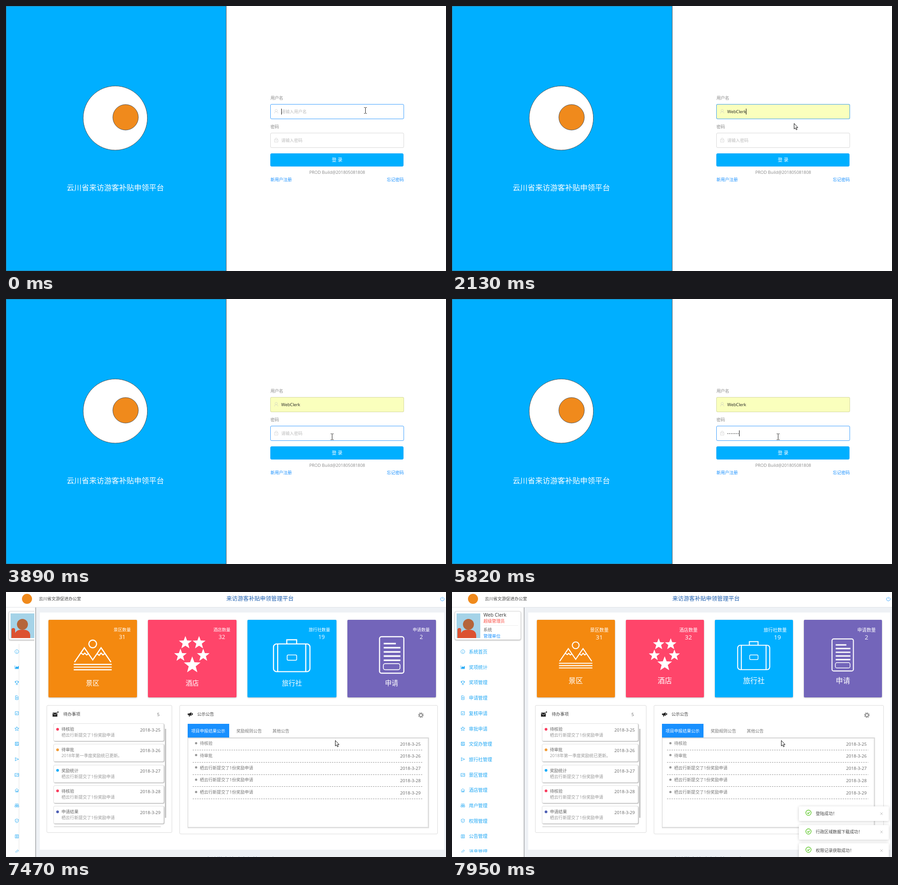
These frames come from a looping animation (964 by 581 pixels, 8 s). An HTML page:

```html
<!DOCTYPE html>
<html lang="zh-CN">
<head>
<meta charset="utf-8">
<title>登录</title>
<style>
html, body { margin: 0; width: 100%; height: 100%; overflow: hidden; background: #fff; }
body { font: 9.3px/20px "Open Sans", "Noto Sans CJK SC", "Noto Sans CJK", sans-serif; color: #555; }
#stage { position: relative; width: 964px; height: 581px; overflow: hidden; }
#stage div, #stage span, #stage svg { position: absolute; box-sizing: border-box; }
svg { overflow: visible; fill: none; stroke: currentColor; }
.t { margin-top: -10px; white-space: nowrap; }
.mid { transform: translateX(-50%); }
.end { transform: translateX(-100%); }
.page { inset: 0; }
.field { left: 579px; width: 293px; height: 33px; padding-left: 23px; border: 1px solid; border-radius: 3px;
  display: flex; align-items: center; white-space: pre; color: #222; }
#stage .field span { position: static; }
.field .caret { width: 1px; height: 13px; margin-right: -1px; background: #111; }
.field .hint { color: #bbb; }
.yellow { background: #faffbd; }
#dots .value { font-size: 7.5px; letter-spacing: .9px; }
#button { left: 579px; top: 323px; width: 292px; height: 29px; border: 1px solid; border-radius: 3px; font-weight: 500; }
#list { left: 579px; top: 247px; width: 293px; height: 21px; border: 1px solid #b4b4b4; background: #fff; }
#dash { background: #eef1f5;
  --c: calc((842.5px - var(--w)) / 4);
  --l: calc((938.5px - var(--w)) / 3 - 16px);
  --a: calc(var(--w) + 23.5px);
  --r: calc(var(--a) + var(--l) + 16px); }
.tile { top: 61px; width: var(--c); height: 170px; border-radius: 2px; color: #fff; box-shadow: 0 1px 3px #0004; }
.tile svg { left: 50%; top: 76.5px; width: 42.8%; transform: translate(-50%, -50%); stroke-width: 2.9; }
.tile .num { right: 13.5px; text-align: center; }
.panel { top: 248px; background: #fff; border: 1px solid #dcdcdc; border-radius: 3px; }
.task { left: 14px; right: 17px; height: 39px; background: #fff; border: 1px solid #e2e2e2; border-radius: 3px;
  box-shadow: 1px 1px 2px #0005; }
.dot { border-radius: 50%; }
.toast { left: 760px; width: 197px; height: 32px; background: #fff; border-radius: 2px; box-shadow: 0 1px 6px #0003; }
</style>
</head>
<body>
<div id="stage"></div>
<script>
const LOOP = 8000;
const SKY = '#00afff';
const px = v => typeof v === 'number' ? v + 'px' : v;

// Text is placed by the middle of its line.
const txt = (x, y, s, color = '', size = 9.3, align = '') =>
  `<span class="t ${align}" style="left:${px(x)};top:${y}px;color:${color};font-size:${px(size)}">${s}</span>`;
const box = (x, y, w, h, style, inner = '') =>
  `<div style="left:${px(x)};top:${y}px;width:${px(w)};height:${px(h)};${style}">${inner}</div>`;
const disc = (x, y, r, color) =>
  `<div class="dot" style="left:${px(x)};top:${y - r}px;margin-left:${-r}px;width:${2 * r}px;height:${2 * r}px;background:${color}"></div>`;
const icon = (x, y, size, color, body, view = 16) =>
  `<svg viewBox="0 0 ${view} ${view}" style="left:${px(x)};top:${y - size / 2}px;margin-left:${-size / 2}px;width:${size}px;height:${size}px;color:${color}">${body}</svg>`;
const path = (d, extra = '') => `<path d="${d}" ${extra}/>`;
const SOLID = 'fill="currentColor" stroke="none"';

function star(cx, cy, r) {
  const pts = Array.from({ length: 10 }, (_, i) => {
    const a = i * Math.PI / 5, q = i % 2 ? r * .42 : r;
    return (cx + q * Math.sin(a)).toFixed(1) + ',' + (cy - q * Math.cos(a)).toFixed(1);
  });
  return 'M' + pts.join('L') + 'z';
}

// ---- Login ----
const field = (id, y, hint) =>
  `<div class="field" id="${id}" style="top:${y}px"><span class="value"></span><span class="caret"></span><span class="hint">${hint}</span></div>`;

const backdrop = `<svg width="964" height="581" style="left:0;top:0" stroke="none">
  <rect width="482.6" height="581" fill="${SKY}"/>
  <circle cx="239.4" cy="245.7" r="70.3" fill="#fff"/>
  <circle cx="262" cy="244" r="28" fill="#f08a1c"/></svg>`;

const login = `<div class="page" id="login" style="background:#fff">
  ${backdrop}
  ${txt(239.5, 398, '云川省来访游客补贴申领平台', '#fff', 16.4, 'mid')}
  ${txt(579.5, 202, '用户名', '#888')}
  ${field('user', 215, '请输入用户名')}
  ${icon(591.5, 231, 10, '#c4c4c4', path('M8 1a4 4 0 1 0 .01 0M2 15c0-4 2-6 6-6s6 2 6 6'))}
  ${txt(579.5, 265, '密码', '#888')}
  ${field('dots', 278, '请输入密码')}
  ${icon(591.5, 294, 10, '#c4c4c4', path('M2 6h12v9H2zM4 6V4a4 3 0 0 1 8 0v2M6 10h4'))}
  <div id="button" style="background:${SKY}">${txt(145.5, 13, '登 录', '#fff', 10.3, 'mid')}</div>
  ${txt(725.5, 365, 'PROD Build@201805081808', '#888', 9.3, 'mid')}
  ${txt(579.5, 381, '新用户注册', '#1890ff')}
  ${txt(871.5, 381, '忘记密码', '#1890ff', 9.3, 'end')}
  <div id="list">${txt(8, 9.5, 'WebClerk', '#222')}</div>
</div>`;

// ---- Dashboard ----
const menu = [
  ['系统首页', 'M8 1a7 7 0 1 0 .01 0M8 7v5M8 4v1'],
  ['奖项统计', 'M1 2v12h14', 'M3 13V9l4-4 3 3 5-5v10z'],
  ['奖项管理', 'M4 2h8v5a4 4 0 0 1-8 0zM4 4H1q0 4 3 4M12 4h3q0 4-3 4M8 11v3M4 15h8'],
  ['申请管理', 'M3 1h7l3 3v11H3zM5 7h6M5 10h6'],
  ['复核申请', 'M2 2h12v12H2zM5 8l2 3 4-5'],
  ['审批申请', star(8, 8.5, 8)],
  ['文促办管理', 'M2 2h12v12H2zM5 2v6h5V2M2 12h12'],
  ['旅行社管理', 'M2 2l13 6-9 3-4 3 1-6z'],
  ['景区管理', 'M1 3h14v11H1zM3 11l3-3 2 2 3-4 3 4'],
  ['酒店管理', 'M1 8l7-6 7 6M3 7v7h10V7M7 14v-4h3v4'],
  ['用户管理', 'M5 2a3 3 0 1 0 .01 0M11 2a3 3 0 1 0 .01 0M1 14V9h6v5zM9 14V9h6v5z'],
  ['权限管理', 'M8 1l6 2v5q0 5-6 7-6-2-6-7V3zM5 8l2 2 4-4'],
  ['公告管理', 'M2 2h12v12H2zM5 5h6M5 8h6M5 11h6'],
  ['消息管理', 'M3 13l1-4 7-7 3 3-7 7z']
];
const menuHtml = menu.map(([name, line, solid], i) => {
  const y = 97 + i * 33.7;
  return icon(24, y, 9.5, '#1ea7f5', path(line, 'stroke-width="1.4"') + (solid ? path(solid, SOLID) : '')) +
    box(37, y - 10, 'calc(6px + (var(--w) - 83px) * .8)', 20, 'overflow:hidden', txt(0, 10, name, '#1ea7f5', 10.2));
}).join('');

const avatar = box(3, 4, 52, 54, 'overflow:hidden;background:#a5d3e8',
  disc(26, 24, 12, '#b5653a') + box(9, 36, 34, 22, 'background:#dc5230;border-radius:12px 12px 0 0') +
  box(2, 32, 8, 26, 'background:#dc5230;border-radius:5px 5px 0 0'));

const sidebar = box(0, 34, 'var(--w)', 547, 'background:#fff') +
  box(0, 34, 'calc(var(--w) - 3px)', 537, 'overflow:hidden',
    box(6, 8, 145, 63, 'background:#fff;border:1px solid #ddd;border-radius:4px;box-shadow:0 1px 3px #0005',
      avatar + txt(62, 7, 'Web Clerk', '#333', 10.6) + txt(62, 21, '超级管理员', '#fa4b41') +
      box(62, 30, 76, 1, 'background:#eee') + txt(62, 40, '系统', '#666') + txt(62, 54, '管理单位', '#1890ff')) +
    box('calc(53px + (var(--w) - 83px) * 1.37)', 80, 1, 457, 'background:#e6e6e6') + menuHtml) +
  box('calc(var(--w) - 1px)', 34, 2, 547, 'background:#b6b8bb');

const header = box(0, 0, 964, 34, 'background:#fff;border-bottom:1px solid #dfe2e6') +
  disc(46, 15, 11, '#f08a1c') +
  txt(72, 15, '云川省文游促进办公室', '#444', 9.25) +
  txt(556.5, 15, '来访游客补贴申领管理平台', '#1d5fb0', 12.3, 'mid') +
  icon(956, 15, 10, '#40a9ff', path('M5 3a6.5 6.5 0 1 0 6 0M8 1v7', 'stroke-width="1.6"'));

const stars = [[32, 18, 18], [68, 18, 18], [19, 51, 17.5], [79, 51, 17.5], [50, 77, 23]];
const tiles = [
  ['景区', 31, '#f4890f',
    path('M50 11a10 10 0 1 0 .01 0M2 69L28 31 50 63 72 31 98 69M19 45l6 4 4-4 5 5 4-3M62 47l5 4 5-6 5 5 5-4M0 75h100M0 82h100M0 89h100')],
  ['酒店', 32, '#ff456a', stars.map(s => path(star(...s), SOLID)).join('')],
  ['旅行社', 19, SKY,
    '<rect x="2" y="21" width="96" height="73" rx="8"/><rect x="38" y="50" width="25" height="14" rx="3" stroke-width="2"/>' +
    path('M37 21V10h26v11M13 21v73M87 21v73')],
  ['申请', 2, '#7365ba',
    '<rect x="18" y="2" width="64" height="96" rx="5"/><rect x="28" y="73" width="44" height="16" rx="5" stroke-width="2"/>' +
    path('M29 20h32M29 31h44M29 42h44M29 53h44M29 64h44', 'stroke-width="4"')]
];
const tileHtml = tiles.map(([name, n, color, art], i) =>
  `<div class="tile" style="left:calc(var(--w) + 27.5px + ${i} * (var(--c) + 24px));background:${color}">
    <span class="t num" style="top:22px;font-size:calc(9.4px * var(--k))">${name}数量</span>
    <span class="t num" style="top:38px;width:calc(37.6px * var(--k));font-size:calc(12.5px * var(--k))">${n}</span>
    <svg viewBox="0 0 100 100">${art}</svg>
    <span class="t mid" style="left:50%;top:calc(96.5px + var(--c) * .215);font-size:calc(14.6px * var(--k))">${name}</span>
  </div>`).join('');

const news = '栖云行新提交了1份奖励申请';
const tasks = [
  ['待核验', news, '#f93e5f'], ['待审批', '2018年第一季度奖励统已更新。', '#f19c38'],
  ['奖励统计', news, '#18aefa'], ['待核验', news, '#f93e5f'], ['申请结果', news, '#4f60b5']
];
const taskHtml = tasks.map(([name, sub, color], i) =>
  `<div class="task" style="top:${39 + i * 45.3}px">${disc(8, 11.5, 3, color)}
    ${txt(17, 12, name, '#666')}${txt(17, 25, sub, '#999')}
    ${txt('calc(100% - 6px)', 13.5, '2018-3-' + (25 + i), '#666', 9.7, 'end')}</div>`).join('');

const todo = `<div class="panel" style="left:var(--a);width:var(--l);height:280px">
  ${icon(19, 19, 14, '#222', path('M0 4h12v10H0zM12 1h3v3h-3z', SOLID) + path('M0 5l6 5 6-5', 'stroke="#fff"'))}
  ${txt(36, 19, '待办事项', '#444')}
  ${txt('calc(100% - 29px)', 20, '5', '#666', 9.7, 'mid')}
  ${taskHtml}
  ${box('calc(100% - 15px)', 51, 3, 195, 'background:#c4c4c4')}
  ${box(15, 264, 'calc(100% - 39px)', 3, 'background:#e6e6e6')}
</div>`;

const rows = ['待核验', '待审批', news, news, news].map((s, i) => {
  const y = 83 + i * 26.8;
  return disc(36, y - 1, 2.5, '#999') + txt(44, y, s, '#777') +
    txt('calc(100% - 37px)', y + 1.5, '2018-3-' + (25 + i), '#666', 9.7, 'end') +
    box(28, Math.round(y + 14), 'calc(100% - 61px)', 1, 'background:repeating-linear-gradient(90deg,#999 0 3px,#fff 3px 5px)');
}).join('');

const notice = `<div class="panel" style="left:var(--r);width:calc(946.5px - var(--r));height:283px">
  ${icon(23, 19, 12, '#222', path('M0 6h4l7-4v11l-7-3H0zM3 10h3v5H4zM12 5h3v5h-3z', SOLID))}
  ${txt(38, 19, '公示公告', '#444')}
  ${icon('calc(100% - 36px)', 21, 12, '#999', '<circle cx="8" cy="8" r="4.6" stroke-width="3.2"/><circle cx="8" cy="8" r="7" stroke-width="2.4" stroke-dasharray="2.75"/>')}
  ${box(17, 70, 'calc(100% - 35px)', 199, 'border:1px solid #ccc;border-width:2px 3px 3px 1px;border-color:#d4d4d4 #e0e0e0 #e0e0e0 #ccc')}
  ${box(17, 40, 91, 30, 'background:#1890ff')}
  ${txt(62.5, 56, '项目申报结果公示', '#fff', 9.3, 'mid')}
  ${txt(124, 56, '奖励规则公告', '#777')}
  ${txt(203, 56, '其他公告', '#777')}
  ${rows}
</div>`;

const dash = `<div class="page" id="dash">
  ${box('calc(var(--w) + 9px)', 45, 'calc(951px - var(--w))', 520, 'background:#fff')}
  ${txt('calc((var(--w) + 964px) / 2)', 586, '来访游客补贴申领管理平台', '#6d86ad', 13, 'mid')}
  ${tileHtml}${todo}${notice}${sidebar}${header}
</div>`;

const toasts = [['登陆成功！', 7470], ['行政区域数据下载成功！', 7640], ['权限记录获取成功！', 7700]];
const toastHtml = toasts.map(([s], i) =>
  `<div class="toast" style="top:${470 + i * 40.5}px">
    ${icon(21, 14, 14, '#52c41a', '<circle cx="8" cy="8" r="6.6" stroke-width="1.4"/>' + path('M5 8l2.2 2.5L11 6', 'stroke-width="1.5"'))}
    ${txt(37, 15.5, s, '#444')}
    ${icon(180.5, 15.5, 6, '#aaa', path('M1 1l14 14M15 1L1 15', 'stroke-width="2"'))}
  </div>`).join('');

const pointer = `<svg id="arrow" width="10" height="16" viewBox="0 0 10 16">
    ${path('M.5 .5v12.2l2.7-2.5 1.9 4.3 2-.9-1.9-4.1h3.6z', 'fill="#fff" stroke="#111"')}</svg>
  <svg id="beam" width="7" height="14" viewBox="0 0 7 14" style="margin:-7px 0 0 -3px">
    ${path('M.5 .5h2l1 .8 1-.8h2M.5 13.5h2l1-.8 1 .8h2M3.5 1v12', 'stroke="#222"')}</svg>`;

document.getElementById('stage').innerHTML = login + dash + toastHtml + pointer;

// ---- Motion ----
const $ = id => document.getElementById(id);
const toastEls = document.querySelectorAll('.toast');
const clamp = v => Math.min(1, Math.max(0, v));
const smooth = v => { v = clamp(v); return v * v * (3 - 2 * v); };
const easeOut = v => 1 - (1 - clamp(v)) ** 3;
const within = (t, spans) => spans.some(([a, b]) => t >= a && t < b);

const SUGGEST = 1260, FILL = 1760, SUGGEST_END = 2130;
const SWITCH = 3070, HOVER = 6770, SUBMIT = 7100, OPEN = 7470, STEP = 62;

// start, end, steps, target x, target y
const moves = [
  [940, 940, 1, 776, 229], [1570, 1880, 6, 749, 257],
  [2380, 3010, 10, 714, 302], [6640, 6830, 4, 721, 325]
];
const keyTimes = [4210, 4340, 4640, 4890, 5210, 5520, 5820, 6140];
const userCaret = [[0, 690], [1190, 1690], [SUGGEST_END, 2630]];
const passCaret = [[SWITCH, 3890], [4210, 6640]];

function mouseAt(t) {
  let x = 787, y = 229;
  for (const [a, b, n, tx, ty] of moves) {
    if (t < a) break;
    const step = Math.min(n, Math.floor((t - a) / (b - a || 1) * (n - 1)) + 1);
    const k = Math.sin(step / n * Math.PI / 2);
    x += (tx - x) * k;
    y += (ty - y) * k;
  }
  return [Math.round(x), Math.round(y)];
}

function setField(id, value, caret, focus) {
  const el = $(id), [val, bar, hint] = el.children;
  val.textContent = value;
  bar.style.opacity = caret ? 1 : 0;
  hint.style.display = value ? 'none' : '';
  el.style.borderColor = `rgba(0,${130 * focus},${255 * focus},${.15 + .6 * focus})`;
}

function render(t) {
  const filled = t >= FILL;
  const switched = clamp((t - SWITCH) / 200);
  setField('user', filled ? 'WebClerk' : '', within(t, userCaret), 1 - switched);
  $('user').classList.toggle('yellow', filled);
  setField('dots', '•'.repeat(keyTimes.filter(k => t >= k).length), within(t, passCaret),
    switched - clamp((t - SUBMIT) / 200));

  $('list').style.display = within(t, [[SUGGEST, SUGGEST_END]]) ? '' : 'none';
  $('list').style.background = filled ? '#dcdcdc' : '#fff';
  $('button').style.borderColor = t >= HOVER ? '#55b9f6' : '#22adfa';

  const open = t >= OPEN;
  const tick = OPEN + Math.floor((t - OPEN) / STEP) * STEP;
  const w = 65 + 93 * smooth((tick - OPEN - STEP) / 222);
  $('login').style.display = open ? 'none' : '';
  $('dash').style.display = open ? '' : 'none';
  $('dash').style.setProperty('--w', w.toFixed(2) + 'px');
  $('dash').style.setProperty('--k', 1 + .08 * clamp((w - 83) / 75));

  toasts.forEach(([, start], i) => {
    const k = easeOut((tick - start) / 140);
    toastEls[i].style.opacity = k;
    toastEls[i].style.transform = `translateX(${(1 - k) * 210}px)`;
  });

  const [x, y] = mouseAt(t);
  const typing = (y >= 215 && y < 248) || (y >= 279 && y < 311);
  for (const [id, on] of [['beam', typing], ['arrow', !typing]]) {
    $(id).style.display = on ? '' : 'none';
    $(id).style.left = x + 'px';
    $(id).style.top = y + 'px';
  }
}

const begin = performance.now();
function frame() {
  render((performance.now() - begin) % LOOP);
  requestAnimationFrame(frame);
}
frame();
</script>
</body>
</html>
```
